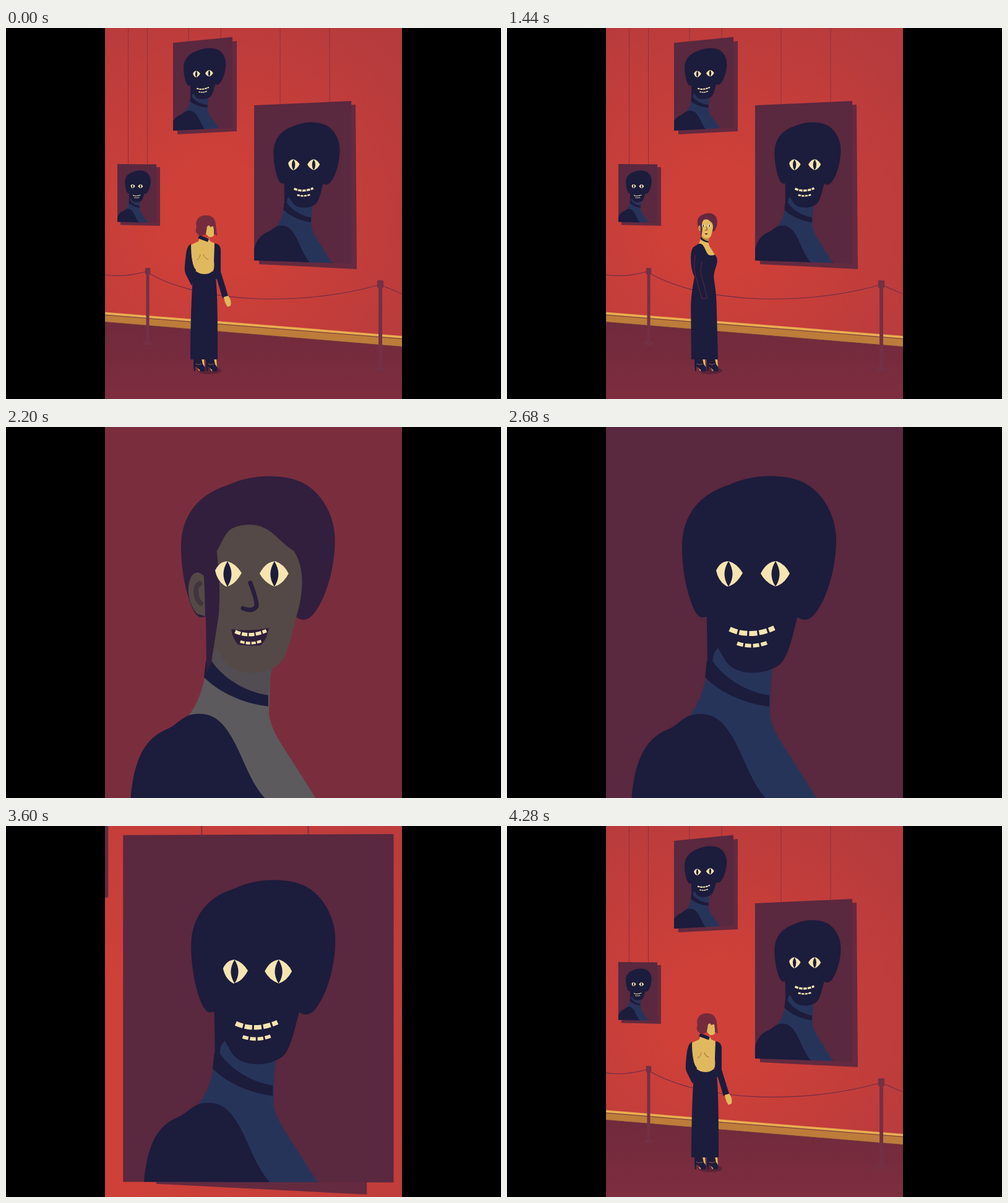
An HTML page that plays this animation: 800x600 px, repeating every 4320 ms.

```html
<!DOCTYPE html>
<html lang="en">
<head>
<meta charset="utf-8">
<title>The gallery</title>
<style>
  html, body { margin: 0; width: 100%; height: 100%; overflow: hidden; background: #000; }
  svg { position: absolute; left: 160px; top: 0; width: 480px; height: 600px; overflow: hidden; }
  .dress { fill: #1c1c3c; }
  .skin { fill: var(--skin); }
  .neck { fill: var(--neck); }
  .shade { fill: var(--shade); }
  .hair { fill: var(--hair); }
  .nose, .seam, .inner { fill: none; stroke-linecap: round; stroke-linejoin: round; }
  .nose { stroke: var(--nose); stroke-width: 7; }
  .seam { stroke: var(--seam); stroke-width: 6; }
  .inner { stroke: var(--inner); stroke-width: 8; }
  .mouth { fill: var(--mouth); }
  .eye { fill: #f6e5b0; }
  .teeth { fill: none; stroke: #f6e5b0; }
  .ghoul {
    --skin: #1c1c3c; --neck: #27345a; --shade: #27345a; --hair: #1c1c3c; --nose: #1c1c3c;
    --seam: #1c1c3c; --inner: #1c1c3c; --mouth: #1c1c3c;
  }
  .panel { fill: #5a283f; }
  .cast { fill: #642a3f; }
  .post { fill: #743044; }
  .wire { fill: none; stroke: #8c3040; }
  .rope { fill: none; stroke: #6f2b45; stroke-width: 1.1; }
</style>
</head>
<body>
<svg viewBox="160 0 480 600" id="stage"></svg>
<script>
const LOOP = 4320;
const SWAP = 800;      // she has turned far enough to show her face
const HANDOVER = 3000; // her portrait becomes the one on the wall

// One bust, drawn at close-up size; the long dress is hidden by the picture frames.
const figure = () => `
  <path class="neck" d="M330 370 L341 350 L428 385 L425 465 C430 492 442 508 456 530 L503 604 L535 680 L380 690 L288 475
    C308 455 318 425 322 400Z"/>
  <path class="shade" d="M331 378 L340 348 L430 385 L424 436 C390 431 350 405 331 378Z"/>
  <path class="dress" d="M332 378 C350 405 385 428 424 434 L424 452 C385 448 345 430 320 405 L323 378Z"/>
  <path class="hair" d="M283 190 C284 142 312 108 358 94 C400 74 452 76 480 90 C514 108 533 148 532 186
    C531 235 515 282 496 304 Q484 317 470 308 L320 307 Q312 311 305 300 C293 280 282 232 283 190Z"/>
  <path class="skin" d="M338 205 C356 178 352 160 390 158 C428 156 438 184 465 200 C484 226 481 270 470 305
    C462 335 455 372 441 384 C418 402 370 404 353 378 L341 357 L327 375Z"/>
  <path class="skin" d="M321 242 Q308 228 299 243 C290 262 296 288 309 302 L322 306Z"/>
  <path class="inner" d="M313 253 C303 258 307 280 315 285"/>
  <path class="hair" d="M316 190 L340 195 C345 235 347 280 343 310 L332 380 L324 400 C324 340 323 270 316 190Z"/>
  <path class="nose" d="M395 252 C400 265 406 282 405 290 Q399 300 383 293"/>
  <g class="jaw">
    <path class="mouth" d="M364 327 Q395 331 425 325 Q422 344 412 353 Q394 355 375 352 Q366 342 364 327Z"/>
    <g class="grin">
      <path class="teeth" stroke-width="8" stroke-dasharray="13 3.2" d="M360 327 Q394 342 432 325"/>
      <path class="teeth" stroke-width="6" stroke-dasharray="10 3" d="M372 350 Q396 358 420 349"/>
    </g>
  </g>
  <path class="eye" d="M338 232 Q345 217 358 217 Q372 221 381 236 Q370 256 356 258 Q342 251 338 232Z
    M410 237 Q420 217 436 217 Q450 222 457 237 Q448 254 434 258 Q418 252 410 237Z"/>
  <path class="dress" d="M358 217 Q371 238 358 258 Q345 238 358 217Z M434 217 Q447 238 434 258 Q421 238 434 217Z"/>
  <path class="dress" d="M206 1924 L200 1250 C202 1120 228 970 246 882 C214 820 196 740 200 620 C204 540 222 504 262 488
    C280 480 286 464 312 464 C338 464 352 480 366 504 C386 540 396 580 424 606 C450 618 484 610 502 602
    C526 630 536 660 532 690 C524 760 490 800 489 888 C500 980 522 1080 524 1250 L542 1924Z"/>
  <path class="seam" d="M255 607 C240 710 240 770 248 826 L339 1160 L408 1153 L321 816 Q326 750 339 692"/>`;

const poly = pts => pts.map(p => p.join(',')).join(' ');

const picture = (frame, cast, matrix, id) => `
  <polygon class="cast" points="${cast}"/>
  <polygon class="panel" id="panel-${id}" points="${frame}"/>
  <clipPath id="clip-${id}"><polygon points="${frame}"/></clipPath>
  <g clip-path="url(#clip-${id})"><g class="ghoul" id="bust-${id}" transform="matrix(${matrix})">${figure()}</g></g>`;

const post = (x, top, base, w) => `
  <rect class="post" x="${x - w / 2}" y="${top + 6}" width="${w}" height="${base - top - 6}"/>
  <rect class="post" x="${x - w * .85}" y="${top}" width="${w * 1.7}" height="${w * 2.1}" rx="1.5"/>
  <ellipse class="post" cx="${x}" cy="${base - 1}" rx="${w * 1.65}" ry="3.2"/>`;

const shoe = x => `
  <g transform="translate(${x} 535)">
    <path fill="#e0b95f" d="M2 0 H17 L18 13 L9 20 L4 10Z"/>
    <path class="dress" d="M0 0 H13 L15 9 Q20 14 18 20 Q12 22 9 17 L3 12 L3 20 H1 L0 11Z"/>
    <path stroke="#8d5a4c" fill="none" d="M3 8 Q8 11 13 8"/>
  </g>`;

const back = `
  <path class="dress" d="M303 394 H337 C342 410 342 470 342 536 H298 C298 480 300 420 303 394Z"/>
  <path fill="#e0b95f" d="M313 338 L328 340 L330 345 L339 349 L337 386 Q334 398 321 398 Q307 398 303 386 L296 352
    L311 345Z"/>
  <path class="dress" d="M299 349 C292 353 291 362 289 385 Q288 393 291 399 L300 417 L305 402 L307 391 Q299 384 299 349Z"/>
  <path class="dress" d="M299 349 Q297 375 304 388 L306 399 L301 405 L297 394Z"/>
  <path class="dress" d="M337 348 Q346 349 347 358 V394 L359 433 L350 437 L341 407 L332 399 Q338 392 336 376Z"/>
  <path fill="#e0b95f" d="M352 435 L359 433 Q365 440 363 449 L358 451 Q353 444 352 435Z"/>
  <path class="dress" d="M313 335 L328 341 L326 346 L310 340Z"/>
  <path fill="none" stroke="#a5733f" d="M308 375 Q313 373 314 366 M319 366 Q321 373 327 374"/>
  <path fill="#752b3e" d="M308 322 C305 310 313 303 322 303 C333 302 339 309 339 319 L341 336 L332 330 L322 334
    Q315 338 309 333 Q305 328 308 322Z"/>
  <path fill="#e0b95f" d="M325 321 Q329 317 330 322 L336 320 V335 Q334 339 328 338 L323 333Z"/>
  <path fill="#752b3e" d="M332 313 L338 314 L341 336 Q336 331 335 321Z"/>`;

document.getElementById('stage').innerHTML = `
  <defs><radialGradient id="wall" gradientUnits="userSpaceOnUse" cx="340" cy="310" r="390">
      <stop offset=".2" stop-color="#cf4038"/><stop offset="1" stop-color="#b63b3d"/></radialGradient>
    <linearGradient id="floor" x2="0" y2="1"><stop stop-color="#702a3c"/><stop offset="1" stop-color="#842f40"/></linearGradient>
  </defs>
  <g id="world">
    <rect x="100" y="-60" width="600" height="720" fill="url(#wall)"/>
    <path class="wire" d="M197.5 -60V221M228.5 -60V221M295 -60V22M347 -60V17M443 -60V123M523 -60V120"/>
    <polygon fill="url(#floor)" points="160,475 640,515 640,660 160,660"/>
    <polygon fill="#bd7c3a" points="160,463 640,501 640,515.5 160,475.5"/>
    <polygon fill="#e8ad50" points="160,459.5 640,498 640,502 160,463.5"/>
    <path stroke="#70353b" fill="none" d="M160 464L640 502.5M160 475.5L640 515.5"/>
    ${picture('270,24 366,14.5 366,161 270,166', '277,30 373,21 373,167 277,172', '.274 -.016 0 .258 209.5 19', 'b')}
    ${picture('180,220 243,220.5 243,315 180,313.5', '185,225 249,225 249,320 185,318.5', '.167 0 0 .161 145 217.8', 'c')}
    ${picture('401,125 558,118 558,381 401,376', '409,131 565,124 567,390 409,382', '.43 0 0 .434 310.7 118', 'a')}
    <path class="rope" d="M160 399Q190 404 226 394M233 398C320 446 480 450 601 416M609 417L640 430"/>
    ${post(229, 388, 511, 5)}${post(605, 408, 553, 6)}
    <rect id="dusk" x="100" y="-60" width="600" height="720" fill="#5a283f"/>
    <g id="feet"><ellipse cx="329" cy="554" rx="19" ry="6" fill="#5a2338"/>${shoe(303)}${shoe(323)}</g>
    <g id="back">${back}</g>
    <g id="front"><g id="woman" transform="translate(307.8 299.6) scale(${1 / 7.8}) translate(-283 -80)">
      <path class="skin" d="M335 1150 L404 1150 Q386 1210 392 1270 Q380 1312 345 1305 L306 1290 Q300 1250 335 1200Z"/>
      ${figure()}</g></g>
  </g>`;

const el = id => document.getElementById(id);
const lerp = (a, b, k) => a + (b - a) * k;
const ramp = (t, a, b) => Math.min(1, Math.max(0, (t - a) / (b - a)));
const ease = (t, a, b) => .5 - .5 * Math.cos(Math.PI * ramp(t, a, b));
const rgb = hex => [1, 3, 5].map(i => parseInt(hex.slice(i, i + 2), 16));
const mix = (a, b, k) => `rgb(${rgb(a).map((v, i) => Math.round(lerp(v, rgb(b)[i], k)))})`;

const TONES = {
  skin: ['#e2bb60', '#1c1c3c'], neck: ['#e2bb60', '#27345a'], shade: ['#bd8740', '#27345a'],
  hair: ['#65283f', '#1c1c3c'], nose: ['#4a2340', '#1c1c3c'], seam: ['#7a2b40', '#1c1c3c'],
  inner: ['#a5733f', '#1c1c3c'], mouth: ['#5a2338', '#1c1c3c']
};
const START = [[382, 119.6], [590.7, 119.6], [590.7, 381], [382, 381]];
const END = [[401, 125], [558, 118], [558, 381], [401, 376]];
const BUST = [[.4348, .43], [.4348, .434], [312.5, 310.7], [119.6, 118]];

function zoom(s, x, y) {
  el('world').setAttribute('transform', `translate(${x * (1 - s)} ${y * (1 - s)}) scale(${s})`);
}

function hang(k) {
  const pts = poly(START.map((p, i) => p.map((v, j) => lerp(v, END[i][j], k))));
  el('panel-a').setAttribute('points', pts);
  el('clip-a').firstElementChild.setAttribute('points', pts);
  const [sx, sy, x, y] = BUST.map(([a, b]) => lerp(a, b, k));
  el('bust-a').setAttribute('transform', `matrix(${sx} 0 0 ${sy} ${x} ${y})`);
}

function turn(t, facing) {
  const w = facing ? lerp(.85, 1, ease(t, SWAP, SWAP + 120)) : lerp(1, .85, ease(t, SWAP - 120, SWAP));
  el('front').style.display = facing ? '' : 'none';
  el('back').style.display = facing ? 'none' : '';
  el(facing ? 'front' : 'back').setAttribute('transform', `translate(${320 * (1 - w)} 0) scale(${w} 1)`);
}

function haunt(t) {
  const dark = ease(t, 1880, 2380), open = ease(t, 1800, 2220), bare = ease(t, 1960, 2400);
  const woman = el('woman');
  for (const name in TONES) woman.style.setProperty('--' + name, mix(...TONES[name], dark));
  woman.querySelector('.jaw').setAttribute('transform',
    `translate(393 341) scale(${lerp(.58, 1, open)}) translate(-393 -341)`);
  const grin = woman.querySelector('.grin');
  grin.setAttribute('opacity', ramp(t, 1900, 2080));
  grin.setAttribute('transform', `translate(395 340) scale(${lerp(.3, 1, bare)}) translate(-395 -340)`);
  el('dusk').setAttribute('opacity', dark);
}

function draw(t) {
  const hung = t >= HANDOVER;
  const out = ease(t, 3410, 4290);
  if (hung) zoom(lerp(2.3, 1, out), 552.9, 211.6);
  else zoom(lerp(1, 7.8, ease(t, 1500, 2220)), 311.45, 331.9);
  hang(hung ? out : 1);
  turn(hung ? 0 : t, !hung && t >= SWAP);
  haunt(hung ? 0 : t);
}

const born = performance.now();
function tick() {
  draw((performance.now() - born) % LOOP);
  requestAnimationFrame(tick);
}
tick();
</script>
</body>
</html>
```
